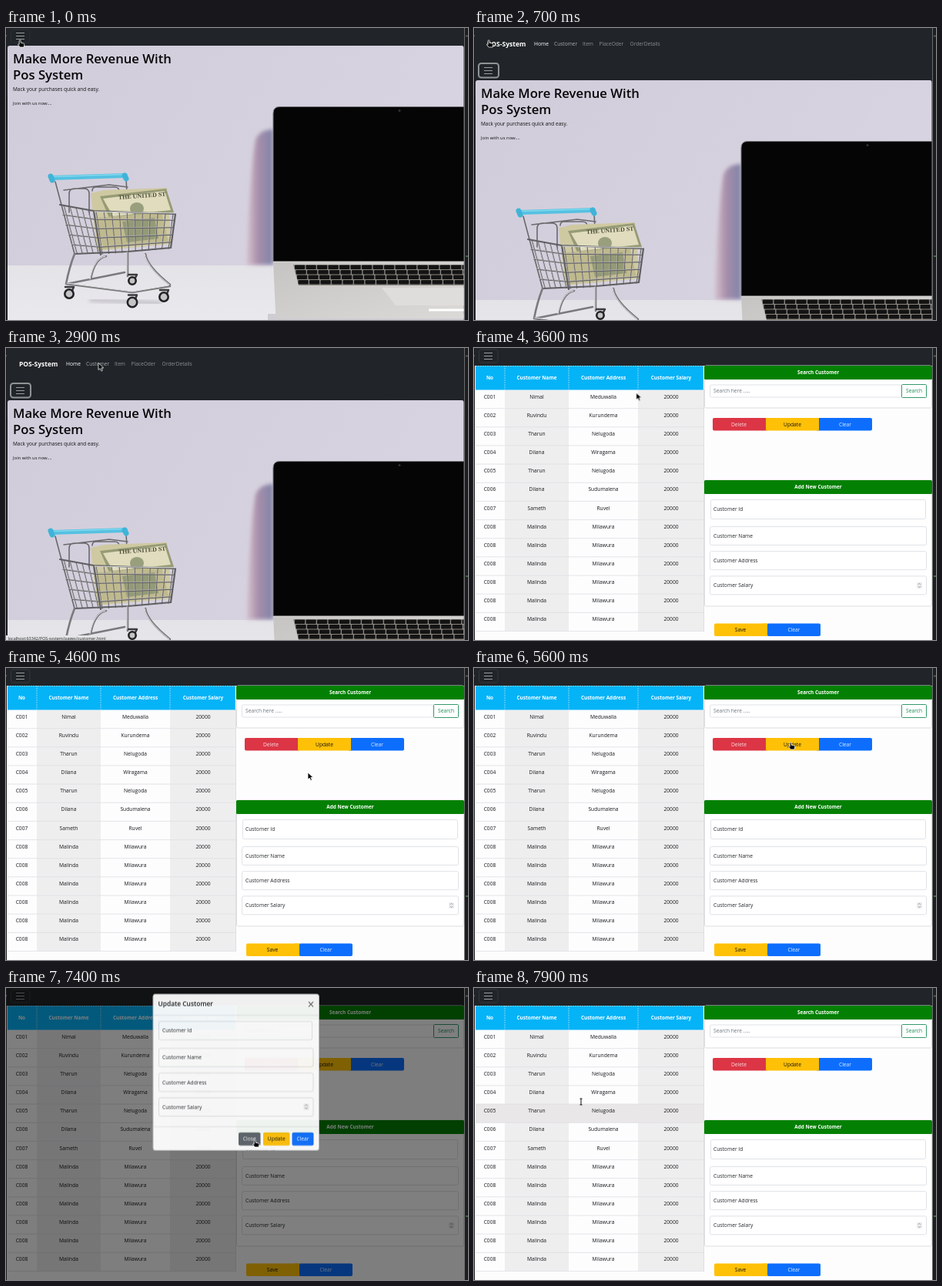
An HTML page for the animation above (8 s loop, 600 by 380 pixels).

```html
<!DOCTYPE html>
<html lang="en">
<head>
<meta charset="utf-8">
<title>POS system</title>
<style>
html, body { margin: 0; width: 100%; height: 100%; overflow: hidden; background: #1b1d1f; }
svg { display: block; width: 600px; height: 380px; font-family: "Open Sans", "Noto Sans", sans-serif; }
text { white-space: pre; }
.b { font-weight: 700; }
.m { font-weight: 600; }
.n { font-weight: 500; }
.mid { text-anchor: middle; }

#home, #cust, #status, #ring, #hover, .glyph { animation: 8s step-end infinite; }
#home { animation-name: home; }
#cust { animation-name: cust; }
#status { animation-name: status; }
#ring { animation-name: ring; }
#hover { animation-name: hover; }
#arrow { animation-name: arrow; }
#hand { animation-name: hand; }
#beam { animation-name: beam; }
@keyframes home { 0% { opacity: 1 } 37.5%, 100% { opacity: 0 } }
@keyframes cust { 0% { opacity: 0 } 37.5%, 100% { opacity: 1 } }
@keyframes status { 0% { opacity: 0 } 23.75% { opacity: 1 } 37.5%, 100% { opacity: 0 } }
@keyframes ring { 0% { opacity: 0 } 3.75%, 100% { opacity: 1 } }
@keyframes hover { 0% { opacity: 0 } 98%, 100% { opacity: 1 } }
@keyframes arrow { 0% { opacity: 0 } 9% { opacity: 1 } 17% { opacity: 0 } 35% { opacity: 1 } 67% { opacity: 0 } 71% { opacity: 1 } 87% { opacity: 0 } 94.5% { opacity: 1 } 98%, 100% { opacity: 0 } }
@keyframes hand { 0% { opacity: 1 } 9% { opacity: 0 } 17% { opacity: 1 } 35% { opacity: 0 } 67% { opacity: 1 } 71% { opacity: 0 } 87% { opacity: 1 } 94.5%, 100% { opacity: 0 } }
@keyframes beam { 0% { opacity: 0 } 98%, 100% { opacity: 1 } }

#drop { animation: drop 8s ease infinite; }
@keyframes drop {
  0%, 3.75% { transform: translateY(0) }
  8.125%, 100% { transform: translateY(45px) }
}
#shade { animation: shade 8s linear infinite; }
@keyframes shade {
  0%, 70.75% { opacity: 0 }
  72.6%, 96.1% { opacity: .5 }
  98%, 100% { opacity: 0 }
}
#modal { animation: fade 8s linear infinite, slide 8s ease-out infinite; }
@keyframes fade {
  0%, 72.6% { opacity: 0 }
  74.5%, 92.4% { opacity: 1 }
  94.25%, 100% { opacity: 0 }
}
@keyframes slide {
  0%, 72.6% { transform: translateY(-21.6px) }
  76.4%, 92.4% { transform: translateY(0) }
  96.1%, 100% { transform: translateY(-21.6px) }
}
#cursor { animation: move 8s ease-in-out infinite; }
@keyframes move {
  0%, 8% { transform: translate(18px, 16px) }
  19%, 39% { transform: translate(120px, 19.5px) }
  54%, 59% { transform: translate(392px, 136px) }
  68%, 76% { transform: translate(411px, 97px) }
  89%, 93.5% { transform: translate(323px, 198px) }
  98.5%, 100% { transform: translate(139px, 148px) }
}
</style>
</head>
<body>
<svg viewBox="0 0 600 380">
  <defs>
    <linearGradient id="wall" x1="0" y1="0" x2="1" y2="0.4">
      <stop offset="0" stop-color="#d1ccda"/><stop offset="1" stop-color="#d9d4e1"/>
    </linearGradient>
    <linearGradient id="floor" x1="0" y1="0" x2="0" y2="1">
      <stop offset="0" stop-color="#e4e3e7"/><stop offset="1" stop-color="#ebeaee"/>
    </linearGradient>
    <linearGradient id="metal" x1="0" y1="0" x2="1" y2="1">
      <stop offset="0" stop-color="#c6c4c3"/><stop offset="1" stop-color="#dcdad8"/>
    </linearGradient>
    <linearGradient id="cast" x1="0" y1="0" x2="1" y2="0">
      <stop offset="0" stop-color="#c9a9b6" stop-opacity=".5"/>
      <stop offset=".4" stop-color="#a990ab"/><stop offset="1" stop-color="#7f83a8"/>
    </linearGradient>
    <filter id="soft" x="-50%" y="-20%" width="200%" height="140%"><feGaussianBlur stdDeviation="2.500"/></filter>
    <clipPath id="view"><path d="M2 26q0-3 3-3H592q2.500 0 2.500 3V400H2z"/></clipPath>
  </defs>

  <rect width="600" height="380" fill="#1b1d1f"/>

  <g id="home">
    <rect x="1" width="594" height="90" fill="#212529"/>
    <g id="menu"></g>
    <g id="drop">
      <rect x="1" width="594" height="26" fill="#212529"/>
      <rect x="6.500" y="2" width="24.500" height="17" rx="3" fill="none" stroke="#2c3034"/>
      <rect id="ring" x="6" y="1" width="26" height="18.500" rx="3.500" fill="none" stroke="#909396" stroke-width="2"/>
      <path d="M13 6.500h11m-11 4h11m-11 4h11" stroke="#9b9d9f"/>
      <g clip-path="url(#view)">
        <rect y="23" width="600" height="360" fill="url(#wall)"/>
        <path d="M0 309H350V400H0z" fill="url(#floor)"/>
        <path d="M313 308Q317 180 324 146Q329 132 347 132V308z" fill="url(#cast)" filter="url(#soft)"/>
        <g id="laptop">
          <path d="M340 372H600V400H340z" fill="#cfcdd2"/>
          <path d="M347 303H600V378H360q-9 0-10-8z" fill="url(#metal)"/>
          <path d="M347 304V111q0-8.500 8.500-8.500H600V304z" fill="#050506" stroke="#77767b"/>
          <circle cx="511" cy="107.500" r="1.500" fill="#30323a"/>
          <path d="M347 304.500H600" stroke="#d4d2d0" stroke-width="1.500"/>
          <path d="M373 308H600V335H380z" fill="#8b8680"/>
          <g id="keys"></g>
          <path d="M488 338H600V361H506z" fill="#dfdddb"/>
          <path d="M549 367H600" stroke="#fff" stroke-width="3"/>
        </g>
        <g id="cart" fill="none" stroke-linecap="round" stroke-linejoin="round">
          <path d="M110 354L200 358" stroke="#bab7c0" stroke-width="4" filter="url(#soft)"/>
          <path d="M64 200L89 294M156 196L158 235M75 211L134 204L158 207M82 240V216q0-7 7-7h13q6 0 6 7v26M112 212q0-5 5-5h24q6 0 6 6" stroke="#6a696c" stroke-width="1.600"/>
          <path d="M110 215L127 211L209 208L215 281L118 290z" fill="#cfc9a2"/>
          <path d="M122 219L208 209L218 240L135 249z" fill="#969b75"/>
          <path d="M126 222L206 212L214 237L139 245z" fill="#e0dcbd"/>
          <text x="146" y="223" transform="rotate(-4 146 223)" font-family="Liberation Serif, serif" font-size="8" class="b" fill="#4a4c3a">THE UNITED ST</text>
          <ellipse cx="170" cy="235" rx="9" ry="8" fill="#999f7c"/>
          <path d="M118 247L202 240L211 278L126 288z" fill="#bfb98d"/>
          <path d="M151 252L193 247L198 274L157 279z" fill="#939a76"/>
          <g id="wires"></g>
          <path d="M70 230L114 238L219 242M89 294L158 291L214 286L220 242M114 238L123 295" stroke="#5f5f63" stroke-width="2.200"/>
          <path d="M115 239L220 241" stroke="#dededf"/>
          <path d="M130 297Q115 300 110 327M89 294Q82 312 78 333L164 344L213 336M158 292V323M181 294Q183 310 213 334M79 333L154 318" stroke="#7b7a7d" stroke-width="2.600"/>
          <path d="M79 332L164 343L211 335M129 297Q114 300 109 327M157 292V321M180 294Q182 310 212 334" stroke="#e5e4e6"/>
          <path d="M60 195L155 192" stroke="#55c1e1" stroke-width="6"/>
          <path d="M60 193.500L153 190.500" stroke="#83d8ef" stroke-width="1.500"/>
          <path d="M58 193L60 198M154 192L156 196" stroke="#3fb4d8" stroke-width="7"/>
          <g id="wheels"></g>
        </g>
        <g id="pitch"></g>
      </g>
    </g>
    <g id="status">
      <path d="M0 374H135q2.500 0 2.500 2.500V380H0z" fill="#e4e4e6"/>
      <text x="2.500" y="380" font-size="5.400" fill="#25272a">localhost:63342/POS-system/pages/customer.html</text>
    </g>
  </g>

  <g id="cust">
    <rect x="1" width="594" height="23" fill="#212529"/>
    <rect x="6.500" y="2" width="24.500" height="17" rx="3" fill="none" stroke="#34383c"/>
    <path d="M13 6.500h11m-11 4h11m-11 4h11" stroke="#9b9d9f"/>
    <rect x="1" y="23" width="594" height="357" fill="#fdfdfe"/>
    <g id="table"></g>
    <g id="forms"></g>
    <rect id="shade" x="1" width="594" height="380"/>
    <g id="modal"></g>
  </g>

  <path d="M595.500 0V380" stroke="#686a6c"/>
  <path d="M597 297h3" stroke="#3f6b42" stroke-width="2"/>
  <path d="M597 10.500h3M0 10h1" stroke="#55585a" stroke-width="2"/>

  <g id="cursor" stroke="#fff" stroke-width=".8" stroke-linejoin="round">
    <path id="arrow" class="glyph" d="M0 0V9L2.200 7.200L3.800 10.400L5.400 9.600L3.900 6.500L6.800 6.300z"/>
    <path id="hand" class="glyph" d="M-.8 .8q0-1 1-1t1 1V3.200l3.600 .8q1.200 .3 1 1.600L5.200 9H.2L-2.600 5.400q.4-1.200 1.800 0z"/>
    <path id="beam" class="glyph" d="M-1.500-4H1.500M0-4V4M-1.500 4H1.500" stroke="#111" stroke-width="1"/>
  </g>
</svg>

<script>
const put = (id, html) => document.getElementById(id).innerHTML = html;
const text = (x, y, s, fill = "#212529", size = 6.7, cls = "n") =>
  `<text x="${x}" y="${y + size * 0.36}" font-size="${size}" fill="${fill}" class="${cls}">${s}</text>`;
const box = (x, y, w, h, fill, rx = 0, stroke = "none") =>
  `<rect x="${x}" y="${y}" width="${w}" height="${h}" rx="${rx}" fill="${fill}" stroke="${stroke}"/>`;
const line = (d, stroke, extra = "") => `<path d="${d}" fill="none" stroke="${stroke}" ${extra}/>`;
const button = (x, y, w, h, label, fill, color, rx = 2) =>
  box(x, y, w, h, fill, rx) + text(x + w / 2, y + h / 2, label, color, 6.7, "n mid");
const field = (x, y, w, h, label, textX = x + 5) =>
  box(x + .5, y + .5, w - 1, h - 1, "#fff", 2, "#dfe2e6") + text(textX, y + h / 2, label);
const spinner = (x, y) =>
  box(x - 3.5, y - 4, 7, 8, "#ececec", 1) +
  line(`M${x - 1.5} ${y - 1.2}l1.5-1.5l1.5 1.5M${x - 1.5} ${y + 1.2}l1.5 1.5l1.5-1.5`, "#777", 'stroke-width=".7"');
const range = n => [...Array(n).keys()];
const red = "#dc3545", amber = "#ffc107", blue = "#0d6efd";

put("menu",
  text(17, 20.5, "POS-System", "#fff", 8.5, "b") + text(78, 20.5, "Home", "#fff") +
  text(104, 20.5, "Customer", "#a9abad", 6.6) +
  [[141, "Item"], [162.5, "PlaceOder"], [202.5, "OrderDetails"]]
    .map(([x, s]) => text(x, 20.5, s, "#8c8f92", 6.6)).join(""));

put("pitch",
  text(9, 40, "Make More Revenue With", "#050506", 16.7, "m") +
  text(9, 61, "Pos System", "#050506", 16.7, "m") +
  text(9, 80, "Mack your purchases quick and easy.", "#111", 6.5) +
  text(9, 97.5, "Join with us now....", "#111", 5.9));

put("keys", range(4).map(r => range(16).map(c =>
  box(375 + r * 1.5 + c * 14.5, 308.5 + r * 6.5, 13.2, 5.6, "#141414", 1)).join("")).join(""));

const wire = d => line(d, "#58575a", 'stroke-width="1.3"') +
  line(d, "#d3d2d4", 'stroke-width=".6" transform="translate(-.6 -.6)"');
put("wires",
  range(11).map(i => wire(`M${117 + i * 10} ${239 + i * .2}L${125 + i * 8.6} ${294 - i * .7}`)).join("") +
  range(4).map(i => wire(`M${74 + i * 4} ${243 + i * 13}L${116 + i * 2} ${249 + i * 12}L${219 - i * 1.5} ${250 + i * 9.5}`)).join("") +
  range(5).map(i => wire(`M${75 + i * 8} ${231 + i * 1.6}L${92 + i * 7} 293`)).join(""));

put("wheels", [[82, 346, 7], [164, 357, 7.5], [205, 350, 7], [164, 329, 6]].map(([x, y, r]) =>
  line(`M${x - 5} ${y - r - 2}h11l-3 ${r}`, "#3b3a3d", 'stroke-width="2.5"') +
  `<circle cx="${x}" cy="${y}" r="${r - 1.3}" fill="#c4c3c6" stroke="#232325" stroke-width="2.600"/>`).join(""));

const cols = [20.5, 81.5, 168, 256], rowH = 24.15, top0 = 54.5;
const people = [
  ["Nimal", "Meduwalla"], ["Ruvindu", "Kurundema"], ["Tharun", "Nelugoda"], ["Dilana", "Wiragama"],
  ["Tharun", "Nelugoda"], ["Dilana", "Sudumalena"], ["Sameth", "Ruvel"],
  ...Array(6).fill(["Malinda", "Milawura"])
];
const labels = ["Customer Id", "Customer Name", "Customer Address", "Customer Salary"];
put("table",
  box(40, top0, 83, 314, "#efeeef") + box(213, top0, 85, 314, "#efeeef") +
  `<rect id="hover" x="2" y="${top0 + rowH * 4}" width="296" height="${rowH}" fill="#e9e7e7"/>` +
  box(2, 23, 296, 31.5, "#05b3f7") +
  line("M2 23.5H298M40 23V54M123 23V54M213 23V54M298 23V54", "#b9e8fb", 'stroke-width=".7" stroke-dasharray="2 1"') +
  ["No", ...labels.slice(1)].map((s, i) => text(cols[i], 38.5, s, "#fff", 6.4, "b mid")).join("") +
  people.map(([name, town], r) => {
    const y = top0 + r * rowH;
    const id = "C" + String(Math.min(r + 1, 8)).padStart(3, "0");
    return line(`M2 ${y + rowH}H298`, "#dedfe2", 'stroke-width=".8"') +
      [id, name, town, "20000"].map((s, i) => text(cols[i], y + 8.7, s, "#16181a", 6.7, "n mid")).join("");
  }).join("") +
  line("M298.5 54V369", "#dedfe2"));

const panel = (y, h, title) =>
  box(299.5, y, 295, h, "#fff", 2, "#dcdddf") + box(299, y, 296, 18, "#038003", 1.5) +
  text(447, y + 9, title, "#fff", 6.4, "b mid");

put("forms",
  panel(23, 55, "Search Customer") +
  box(306.5, 48, 249, 16, "#fff", 2, "#dfe2e6") +
  text(311, 56, "Search here .....", "#6c757d") +
  box(555.5, 47.5, 32, 17, "#fff", 1, "#35996b") + text(571.5, 56, "Search", "#198754", 6.7, "n mid") +
  button(310, 91, 72, 16.5, "", red) + button(444, 91, 73, 16.5, "", blue) +
  text(344, 99.25, "Delete", "#f8dfe1", 6.7, "n mid") +
  text(482, 99.25, "Clear", "#e1edff", 6.7, "n mid") +
  button(379, 91, 69, 16.5, "Update", amber, "#111", 0) +
  panel(172, 164, "Add New Customer") +
  field(307, 197, 280, 26, labels[0], 311) +
  labels.slice(1).map((s, i) => field(306, 232 + i * 32.2, 282, 25, s)).join("") +
  spinner(578.5, 309) +
  button(312, 358.5, 72, 16.5, "", amber) + button(381, 358.5, 69, 16.5, "Clear", blue, "#e1edff") +
  box(375, 358.5, 6, 16.5, amber) + text(346, 366.8, "Save", "#111", 6.7, "n mid"));

put("modal",
  box(191, 9, 215.5, 203.5, "#fff", 3, "#bbbcbe") +
  text(197.5, 22, "Update Customer", "#212529", 8.4, "m") +
  line("M393 19l6 6.5m0-6.5l-6 6.5", "#666", 'stroke-width="1.1"') +
  line("M191 36.5H406M191 181.5H406", "#e3e5e8", 'stroke-width=".8"') +
  field(198, 44, 200, 25, labels[0]) +
  labels.slice(1).map((s, i) => field(198, 79 + i * 32.2, 201.5, 25, s)).join("") +
  spinner(390, 155.5) +
  button(302, 189, 28.5, 17, "Close", "#5c636a", "#fff") +
  button(334, 189, 34.5, 17, "Update", amber, "#111") +
  button(371.5, 189, 28, 17, "Clear", blue, "#fff"));
</script>
</body>
</html>
```
